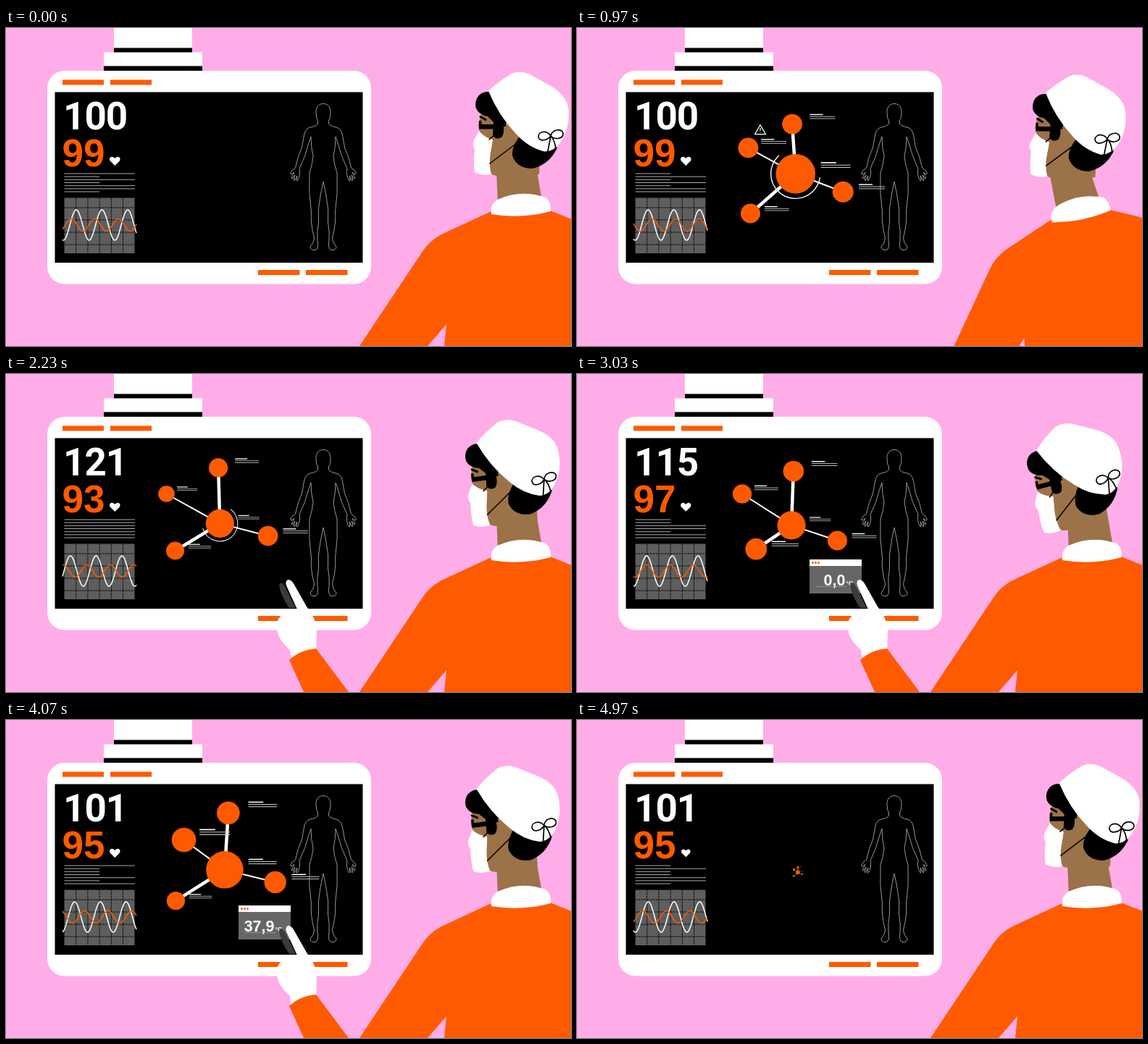
An HTML page for the animation above (5010 ms loop, 780 px wide and 439 px high).

```html
<!DOCTYPE html>
<html lang="en">
<head>
<meta charset="utf-8">
<title>Monitoring room</title>
<style>
  html, body { margin: 0; width: 100%; height: 100%; overflow: hidden; background: #ffade8; }
  svg { display: block; width: 780px; height: 439px; }
  text { font-family: "Liberation Sans", Arial, sans-serif; font-weight: bold; }
  #top { font-family: Roboto, Arial, sans-serif; letter-spacing: -1px; }
  .w { fill: #fff; }
  .o { fill: #ff5a00; }
  .s { fill: #9c7248; }
  .ink { fill: none; stroke: #000; stroke-linecap: round; stroke-linejoin: round; }
</style>
</head>
<body>
<svg viewBox="0 0 780 439">
  <rect width="780" height="439" fill="#ffade8"/>

  <path class="w" d="M149 0H257V28H149ZM135 33.5H271V53H135Z"/>
  <path d="M149 27.5H257V33.5H149ZM135 52.5H271V59.5H135Z"/>
  <rect class="w" x="57" y="59" width="447" height="294.5" rx="24"/>
  <path class="o" d="M78 71.5h57v7h-57zM144 71.5h57v7h-57zM348 334h57.5v7h-57.5zM414 334h57.5v7h-57.5z"/>
  <rect x="67.5" y="88.5" width="425" height="235.5"/>

  <text id="top" class="w" x="79" y="140" font-size="53"></text>
  <text id="low" class="o" x="77.5" y="191" font-size="53"></text>
  <path id="heart" class="w" d="M0 6.5L-6.3 .2C-9.5-3.5-4.5-9-0-3.6C4.5-9 9.5-3.5 6.3 .2Z"/>
  <path id="notes" fill="none" stroke="#aaa"/>

  <rect x="80.5" y="234.5" width="97" height="76.5" fill="#5e5e5e"/>
  <path id="grid" fill="none" stroke="#000" stroke-width=".9" stroke-dasharray="3 1"/>
  <path id="wave1" fill="none" stroke="#fff" stroke-width="1.5"/>
  <path id="wave2" fill="none" stroke="#ff5a00" stroke-width="1.5"/>

  <g id="mol"></g>

  <g fill="none" stroke="#a6a6a6" stroke-width=".9" stroke-linejoin="round">
    <path id="half" transform="translate(438 0)" d="M0 104.5C7 104.5 10.5 110 10 118Q9.5 126 7.5 128V132Q10 136 18 137Q25 139 26.5 148L29.5 165Q35 176 38.5 193Q44 196 45.5 201L44 202L40 199.500L44 207L42.5 208L39 203L41 210L39.5 210.5L36 204L37 210.5L35.5 210.5Q31 203 33 194Q24 176 20.5 160L17 150Q17 165 14 177Q15 188 19 200Q20.5 228 16.5 254Q18 268 12.5 290Q13 297 18 302Q18 307 11 306.5Q6 305 8 293Q9 282 6.5 268Q8 250 4 232Q1 216 0 212"/>
    <use href="#half" transform="matrix(-1 0 0 1 876 0)"/>
  </g>

  <g id="popup">
    <rect x="321" y="256" width="72" height="47" fill="#666"/>
    <rect class="w" x="321" y="256" width="72" height="9"/>
    <path d="M325.5 260.5h0m4 0h0m4 0h0" stroke="#ff5a00" stroke-width="3" stroke-linecap="round"/>
    <text id="temp" class="w" x="370.5" y="291.5" font-size="21.5" text-anchor="end"></text>
    <text class="w" x="371.5" y="291.5" font-size="8.5">°C</text>
    <path d="M330 293.5H371" stroke="#ccc" stroke-width=".8" stroke-dasharray="1 1"/>
  </g>

  <g id="body">
    <path class="s" d="M677 195L679 246L741 244L729 175Z"/>
    <path class="o" d="M422 539L488 439L574 310Q584 294 601 285L670 253Q711 262 751 252L781 264L930 330V600H590L605 439L608 409L582 439L500 539Z"/>
    <path class="w" d="M678 237Q711 222 745 234Q753 240 752 253Q711 264 670 257Q668 244 678 237Z"/>
  </g>

  <g id="head">
    <path class="s" d="M664 108L655 121L652 134L654 146L668 156L667 196Q668 203 678 204L705 206L736 202L738 160L700 100Z"/>
    <path d="M712 146Q698 162 699 176Q705 194 727 194Q751 188 761 165Z"/>
    <path d="M667 88C653 87 646 99 649 111Q653 120 665 122L673 130L672 148Q676 155 684 151Q688 146 687 137Q692 131 692 124L690 105Z"/>
    <path class="ink" stroke-width="3" d="M655 122.5L662 126.500"/>
    <path d="M653 128H656.5V133H690V136H673V139.500H653Z"/>
    <path class="w" d="M653 142L646 155Q643 161 647 168Q645 185 647 199Q657 204.500 670 202Q666 188 669 172Q671 162 672 154Q660 151 653 142Z"/>
    <path class="ink" stroke-width="1.5" d="M668 187L709 156M667 154L674 148"/>
    <path class="w" d="M666 87Q678 75 698 63Q710 58 723 64L752 80Q774 93 776.5 111Q779 139 766 157Q757 171 743 170.5Q721 165 704 146Q680 121 666 87Z"/>
    <path class="ink" stroke-width="1.7" d="M752 149C746 140 735 143 735 150C736 158 748 155 752 149C754 140 766 138 769 145C770 153 758 155 752 149L748 170M752 149Q758 155 759 168"/>
  </g>

  <g id="arm">
    <path id="shade" fill="#3a3a3a" d="M377 291Q380 285 385 293L400 323H391Q379 306 377 291Z"/>
    <path id="hand" class="w" d="M387 292Q385 284 390.5 284Q395 285 398 291L415 321Q428 338 429 352L428 388L394 396L392 381Q373 365 374 347Q374 336 384 331L403 327Z"/>
    <path class="o" d="M391 395Q405 381 428 379L473 439L535 520H450L411 439Z"/>
  </g>
</svg>
<script>
const LOOP = 5010;
const TAU = 2 * Math.PI;
const $ = id => document.getElementById(id);
const set = (el, attrs) => { for (const k in attrs) el.setAttribute(k, attrs[k]); };
const add = (tag, parent, attrs = {}) => {
  const el = document.createElementNS('http://www.w3.org/2000/svg', tag);
  set(el, attrs);
  return parent.appendChild(el);
};
const show = (el, on) => el.setAttribute('visibility', on ? 'visible' : 'hidden');
const zoom = (x, y, s) => `translate(${x} ${y}) scale(${s}) translate(${-x} ${-y})`;

const ramp = (t, a, b) => Math.min(1, Math.max(0, (t - a) / (b - a)));
const ease = (t, a, b) => { const u = ramp(t, a, b); return u * u * (3 - 2 * u); };
// Rises from a to b, falls from c to d
const pulse = (t, a, b, c, d) => ease(t, a, b) * (1 - ease(t, c, d));
// Swings a whole number of times per loop, highest at the given time
const swing = (t, mid, size, times, peak) => mid + size * Math.cos(TAU * times * (t - peak) / LOOP);
const noise = n => { const v = Math.sin(n * 12.9898) * 43758.5453; return v - Math.floor(v); };

// at(t) gives x, y and radius; the label is placed in radii
const core = {
  label: [1.28, -.56, .6],
  at: t => [swing(t, 300, 5, 1, 0), swing(t, 205, 4, 1, 3200), swing(t, 24.5, 5.6, 1, 130)]
};
const left = {
  link: 2, label: [1.28, -.84, 1],
  at: t => [swing(t, 236, 14.5, 1, -260), 165.5, swing(t, 14.4, 3.1, 1, -400)]
};
const nodes = [
  {
    link: 4.5, label: [1.75, -.94, 1],
    at: t => [swing(t, 300, 7.5, 1, -600), swing(t, 131, 3.2, 2, 550), swing(t, 14.5, 1.5, 1, -600)]
  },
  left,
  {
    link: 2, label: [1.5, -.7, 1],
    at: t => [swing(t, 364.5, 7.5, 2, 1450), swing(t, 226.8, 3.3, 3, 1430), swing(t, 14.2, 1, 2, 1450)]
  },
  {
    link: 4.5, label: [1.45, -.7, 1],
    at: t => [swing(t, 240.5, 7, 3, 1430), swing(t, 250, 8.5, 1, 350), swing(t, 13.7, 1.2, 3, 1430)]
  },
  core
];

for (const n of nodes) if (n.link) n.line = add('line', $('mol'), { stroke: '#fff', 'stroke-width': n.link });
for (const n of nodes) {
  n.g = add('g', $('mol'));
  add('circle', n.g, { r: 1, class: 'o' });
  const [x, y, size] = n.label;
  const label = add('g', n.g, { transform: `translate(${x} ${y}) scale(${size})` });
  add('path', label, { d: 'M0 0h1.3', stroke: '#fff', 'stroke-width': .1 });
  add('path', label, { d: 'M0 .2h2.5M0 .4h2.5', stroke: '#ccc', 'stroke-width': .065 });
}
const arc = add('circle', core.g, {
  r: 1.25, fill: 'none', stroke: '#fff', 'stroke-width': .05, pathLength: 360, 'stroke-dasharray': '204 156'
});
const alert = add('path', left.g, {
  d: 'M1.19 -2.28L1.72 -1.35H.66ZM1.19 -1.98V-1.68M1.19 -1.56V-1.5',
  fill: 'none', stroke: '#fff', 'stroke-width': .09, 'stroke-linejoin': 'round'
});

let grid = '';
for (let i = 1; i < 6; i++) grid += `M${80.5 + i * 16.2} 234.5V311`;
for (let i = 0; i < 4; i++) grid += `M80.5 ${248 + i * 17}H177.5`;
set($('grid'), { d: grid });

function sine(amp, period, peak) {
  const points = [];
  for (let x = 78; x <= 180; x++) {
    points.push(x + ' ' + (272 - amp * Math.cos((x - peak) * TAU / period)).toFixed(2));
  }
  return 'M' + points.join('L');
}

function drawMolecule(t) {
  set($('mol'), { transform: zoom(305, 211, pulse(t, 0, 480, 4560, 5070)) });
  const [cx, cy] = core.at(t);
  for (const n of nodes) {
    const [x, y, r] = n.at(t);
    set(n.g, { transform: `translate(${x} ${y}) scale(${r})` });
    if (n.line) set(n.line, { x1: x, y1: y, x2: cx, y2: cy });
  }
  set(arc, { transform: `rotate(${.235 * t - 184})` });
  show(arc, t < 2700);
  show(alert, t < 2130);
}

function drawPanel(t) {
  const step = Math.floor(t / LOOP * 5);
  $('top').textContent = [100, 103, 121, 115, 101][step];
  $('low').textContent = [99, 94, 93, 97, 95][step];

  const beat = (t * 8 / LOOP) % 1;
  const dip = Math.max(0, 1 - Math.abs(beat - .91) / .08);
  set($('heart'), { transform: `translate(150.3 183.5) scale(${1 - .2 * dip})` });

  let rows = '';
  for (let i = 0; i < 7; i++) {
    const long = noise(i + 1 + 7 * Math.floor(t / 400)) > .45;
    rows += `M80.5 ${201 + i * 4.17}H${long ? 178 : 129}`;
  }
  set($('notes'), { d: rows });

  set($('wave1'), { d: sine(21, 35.5, 97 - 5 * 35.5 * t / LOOP) });
  set($('wave2'), { d: sine(8.5, 32.5, 90 - 3 * 32.5 * t / LOOP) });

  const pop = pulse(t, 2720, 2900, 4580, 4760);
  show($('popup'), pop > .01);
  set($('popup'), { transform: zoom(388, 290, pop) });
  $('temp').textContent = (37.9 * ramp(t, 3080, 3900)).toFixed(1).replace('.', ',');
}

function drawDoctor(t) {
  const lean = -11.5 * pulse(t, 0, 1430, 1430, 2130);
  const nod = -7.5 * pulse(t, 1750, 2230, 4750, 4990)
    - 7.5 * pulse(t, 2230, 2680, 3220, 3650)
    - 6 * pulse(t, 4130, 4550, 4550, 4800);
  const sway = `rotate(${lean} 736 356)`;
  set($('body'), { transform: sway });
  // The head stays upright while the body leans
  set($('head'), { transform: `${sway} rotate(${nod - 1.1 * lean} 721 217)` });

  const away = 1 - pulse(t, 1780, 2140, 4810, 4960);
  show($('arm'), away < 1);
  set($('arm'), { transform: `translate(${40 * away} ${165 * away})` });
  set($('hand'), { transform: `rotate(${3 * pulse(t, 2300, 2520, 2520, 2740)} 410 388)` });
  show($('shade'), away < .02);
}

const start = performance.now();
function frame(now) {
  const t = Math.max(0, now - start) % LOOP;
  drawPanel(t);
  drawMolecule(t);
  drawDoctor(t);
  requestAnimationFrame(frame);
}
frame(start);
</script>
</body>
</html>
```
